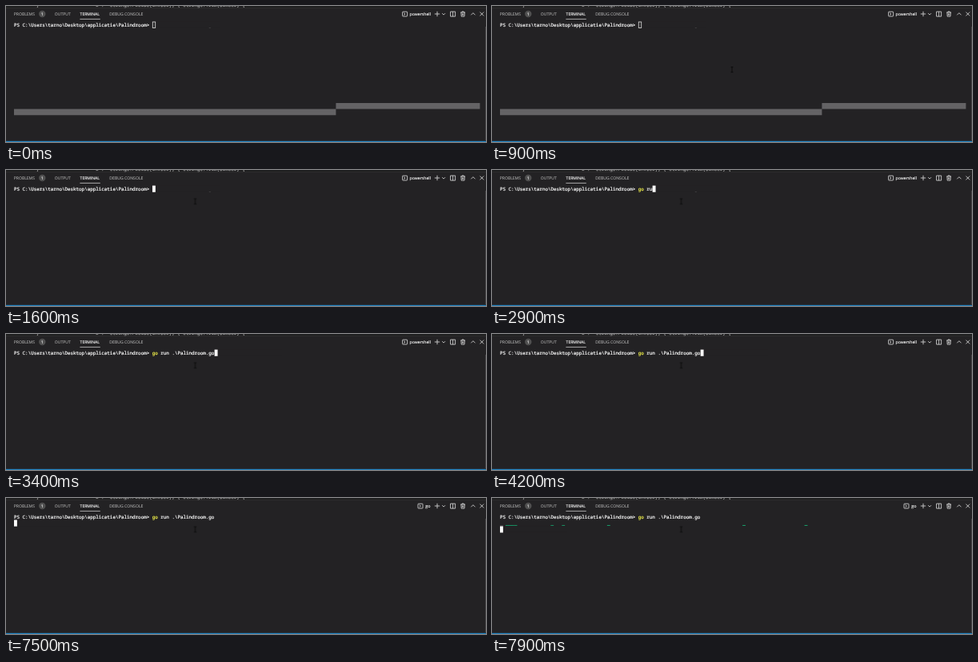
Animation, 600 px wide and 171 px high, one loop 8 s. Source, as an HTML page:

```html
<!DOCTYPE html>
<html lang="en">
<head>
<meta charset="utf-8">
<title>Terminal session</title>
<style>
  :root { --col: 3.53px; --row: 7.85px; --bg: #232224; }
  html, body { margin: 0; width: 100%; height: 100%; overflow: hidden; background: var(--bg); }
  svg { display: block; width: 600px; height: 171px; }
  text { white-space: pre; text-rendering: geometricPrecision; fill: currentColor; stroke: currentColor; }
  .ui { font: 5.05px "Open Sans", "Noto Sans", sans-serif; color: #a6a6a6; stroke-width: .1; }
  .mono { font: 5.884px "Noto Sans Mono", "DejaVu Sans Mono", monospace; color: #f4f4f4; stroke-width: .22; }
  .bright { color: #f0f0f0; stroke-width: .15; }
  .command { fill: #f4f44c; stroke: #f4f44c; }
  .edge { color: #a0a0a0; }
  .bg { fill: var(--bg); }
  .line { fill: none; stroke: #e2e2e2; stroke-width: .8; }

  .caret, .hollow, .solid, .idle, .mouse, .shell, .go, .out {
    animation: 8s step-end infinite;
  }
  .caret { animation-name: caret; }
  .hollow, .idle { animation-name: until-focus; }
  .solid { animation-name: from-focus; }
  .mouse { animation-name: mouse; }
  .shell { animation-name: until-run; }
  .go { animation-name: from-run; }
  .out { animation-name: output; color: #14c882; }

  @keyframes caret {
    0% { transform: translate(calc(49 * var(--col)), 0); }
    33.75% { transform: translate(calc(50 * var(--col)), 0); }
    35% { transform: translate(calc(52 * var(--col)), 0); }
    36.25% { transform: translate(calc(54 * var(--col)), 0); }
    40% { transform: translate(calc(56 * var(--col)), 0); }
    41.25% { transform: translate(calc(58 * var(--col)), 0); }
    42.5% { transform: translate(calc(71 * var(--col)), 0); }
    87.5% { transform: translate(0, var(--row)); }
    97.5%, 100% { transform: translate(0, calc(2 * var(--row))); }
  }
  @keyframes mouse {
    0% { transform: translate(470px, 150px); opacity: 0; }
    10% { transform: translate(420px, 125px); opacity: 1; }
    11.25% { transform: translate(300px, 80px); opacity: 1; }
    12.5% { transform: translate(240px, 48px); opacity: 1; }
    13.75% { transform: translate(231.5px, 41.5px); opacity: 1; }
    20%, 100% { transform: translate(236.5px, 39.5px); opacity: 1; }
  }
  @keyframes until-focus { 0% { opacity: 1; } 20%, 100% { opacity: 0; } }
  @keyframes from-focus { 0% { opacity: 0; } 20%, 100% { opacity: 1; } }
  @keyframes until-run { 0% { opacity: 1; } 91.25%, 100% { opacity: 0; } }
  @keyframes from-run { 0% { opacity: 0; } 91.25%, 100% { opacity: 1; } }
  @keyframes output { 0% { opacity: 0; } 97.5%, 100% { opacity: 1; } }
</style>
</head>
<body>
<svg viewBox="0 0 600 171">
  <defs>
    <g id="prompt-icon" class="line">
      <rect x=".4" y="7.2" width="6" height="5.8" rx=".6"/>
      <path d="M2 8.6l1.8 1.5L2 11.6"/>
    </g>
  </defs>
  <rect class="bg" width="600" height="171"/>

  <!-- editor edge -->
  <rect width="600" height="2" fill="#1e1e1f"/>
  <text class="mono edge" x="38" y="1.1">}</text>
  <text class="mono edge" x="112" y="1.1">i := strings.Fields(invoer), ( strings.Trim(omkeer) {</text>
  <rect y="2.4" width="600" height=".6" fill="#343335"/>

  <!-- panel tabs -->
  <g class="ui">
    <text x="9.8" y="11.9">PROBLEMS</text>
    <circle cx="45.3" cy="10" r="4.2" fill="#505050"/>
    <text class="bright" x="45.3" y="11.8" text-anchor="middle">1</text>
    <text x="60.8" y="11.9">OUTPUT</text>
    <text class="bright" x="92.6" y="11.9">TERMINAL</text>
    <text x="129.3" y="11.9" style="font-size:5.15px">DEBUG CONSOLE</text>
  </g>
  <rect x="92.4" y="16" width="25.4" height=".7" fill="#d8d8d8"/>

  <!-- panel actions -->
  <g class="shell">
    <use href="#prompt-icon" x="495.2"/>
    <text class="ui bright" x="504.5" y="11.9" style="font-size:5.2px">powershell</text>
  </g>
  <g class="go">
    <use href="#prompt-icon" x="514.6"/>
    <text class="ui bright" x="524.2" y="11.9" style="font-size:5.4px">go</text>
  </g>
  <g class="line">
    <path d="M535.8 10h6.4M539 6.8v6.4"/>
    <path d="M545.2 9.2l1.9 1.9 1.9-1.9"/>
    <path d="M555.6 7.1h6v6h-6zM558.6 7.1v6"/>
    <path d="M568.2 8h5.8M570.1 8v-1h2v1M568.9 8l.3 5.1h3.8l.3-5.1M570.4 9.3v2.6M571.8 9.3v2.6"/>
    <path d="M581.3 11.3l2.6-2.6 2.6 2.6"/>
    <path d="M592.4 7.6l4.8 4.8M597.2 7.6l-4.8 4.8"/>
  </g>

  <!-- terminal -->
  <rect x="599" y="26" width="1" height="143" fill="#434244"/>
  <path class="idle" fill="#646365" d="M412.4 121.9H592.4V129.6H412.4zM10 129.4H412.4V137.2H10z"/>
  <text class="mono" x="10" y="25.8">PS C:\Users\tarno\Desktop\applicatie\Palindroom> <tspan class="command">go</tspan> run .\Palindroom.go</text>
  <text class="mono out" x="10" y="34">  ____            _   _               _                                               _                     _</text>
  <g class="caret">
    <rect class="bg" x="10" y="19.6" width="84" height="8.2"/>
    <rect class="hollow line" x="10.3" y="20" width="3.4" height="7.5"/>
    <rect class="solid" x="10" y="19.6" width="3.9" height="8.2" fill="#fafafa"/>
  </g>

  <g class="mouse">
    <path d="M-1.5-3.2h3M0-3.2v6.4M-1.5 3.2h3" fill="none" stroke="#0a0a0a" stroke-width=".8"/>
  </g>

  <!-- status bar edge -->
  <rect y="169.8" width="600" height="1.2" fill="#2587c6"/>
</svg>
</body>
</html>
```
